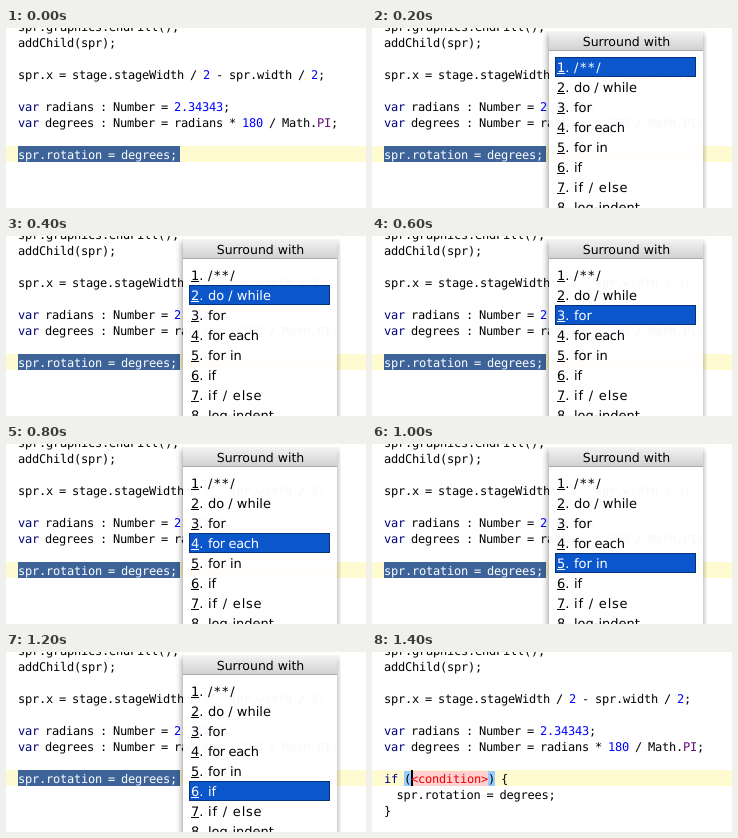
Write an HTML page that moves like this. It is 360x180 px and loops after 1.9 s.

```html
<!DOCTYPE html>
<html lang="en">
<head>
<meta charset="utf-8">
<title>Surround with</title>
<style>
  html, body { margin: 0; width: 100%; height: 100%; overflow: hidden; background: #fff; }
  svg { display: block; width: 360px; height: 180px; }
  text { white-space: pre; text-rendering: geometricPrecision; }
  .code { font: 12px "DejaVu Sans Mono", monospace; letter-spacing: -.224px; word-spacing: -1px; }
  .ui { font: 13px "DejaVu Sans", sans-serif; }
  .title { font-size: 12.5px; }
  .key { fill: #000080; }
  .num { fill: #0000ff; }
  .const { fill: #660e7a; }
  .slot { fill: #f00000; }
</style>
</head>
<body>
<svg id="stage" viewBox="0 0 360 180">
  <defs>
    <linearGradient id="bar" x1="0" y1="0" x2="0" y2="1">
      <stop offset="0" stop-color="#f4f4f4"/>
      <stop offset="1" stop-color="#cecece"/>
    </linearGradient>
    <filter id="blur" x="-20%" y="-20%" width="140%" height="140%">
      <feGaussianBlur stdDeviation="3"/>
    </filter>
    <clipPath id="rim">
      <path d="M169 3H335V180H169ZM177 3V180H331V3Z" clip-rule="evenodd"/>
    </clipPath>
  </defs>
  <rect width="360" height="180" fill="#fff"/>
  <rect y="118" width="360" height="16" fill="#fffbd0"/>
  <g id="code" class="code"></g>
  <g id="before" class="code">
    <rect x="12" y="118" width="162" height="16" fill="#3d6399"/>
  </g>
  <g id="after" class="code">
    <rect x="32" y="119" width="7" height="15" fill="#99ccff"/>
    <rect x="39" y="119" width="77" height="15" fill="#ffd0d0"/>
    <rect x="116" y="119" width="7" height="15" fill="#99ccff"/>
    <rect x="39" y="118" width="2" height="16" fill="#000"/>
  </g>
  <g id="popup" class="ui">
    <g clip-path="url(#rim)">
      <rect x="176" y="6" width="155" height="190" fill="#000" opacity=".4" filter="url(#blur)"/>
    </g>
    <g opacity=".97">
      <rect x="177" y="3" width="154" height="177" fill="#fff"/>
      <rect x="177" y="3" width="154" height="20" fill="url(#bar)"/>
      <path d="M177 22.5H331" stroke="#a8a8a8"/>
    </g>
    <text class="title" x="254.5" y="18" text-anchor="middle">Surround with</text>
    <g id="cursor">
      <rect x="183" y="29" width="141" height="20" fill="#0b56cb"/>
      <rect x="183.5" y="29.5" width="140" height="19" fill="none" stroke="#000" stroke-dasharray="1 1" opacity=".8"/>
    </g>
  </g>
</svg>
<script>
const NS = "http://www.w3.org/2000/svg";
const $ = id => document.getElementById(id);

function add(parent, tag, attrs, content = "") {
  const el = document.createElementNS(NS, tag);
  for (const k in attrs) el.setAttribute(k, attrs[k]);
  el.textContent = content;
  parent.appendChild(el);
  return el;
}

// A line is a list of strings; a [class, string] pair is coloured.
function line(parent, x, y, parts, fill = "#000") {
  const t = add(parent, "text", { x, y, fill });
  for (const p of parts) {
    if (Array.isArray(p)) add(t, "tspan", { class: p[0] }, p[1]);
    else add(t, "tspan", {}, p);
  }
}

const two = ["num", "2"], kw = ["key", "var"];
line($("code"), 12, 3, ["spr.graphics.endFill();"]);
line($("code"), 12, 19, ["addChild(spr);"]);
line($("code"), 12, 51, ["spr.x = stage.stageWidth / ", two, " - spr.width / ", two, ";"]);
line($("code"), 12, 83, [kw, " radians : Number = ", ["num", "2.34343"], ";"]);
line($("code"), 12, 99, [kw, " degrees : Number = radians * ", ["num", "180"], " / Math.", ["const", "PI"], ";"]);

line($("before"), 12, 131, ["spr.rotation = degrees;"], "#fff");

line($("after"), 12, 131, [["key", "if"], " (", ["slot", "<condition>"], ") {"]);
line($("after"), 24.5, 147, ["spr.rotation = degrees;"]);
line($("after"), 12, 163, ["}"]);

// Label and letter spacing of each menu entry.
const entries = [
  ["/**/", 1.6], ["do / while", 0], ["for", 0], ["for each", -.35],
  ["for in", 0], ["if", 0], ["if / else", .8], ["log-indent", 0]
];
const rows = entries.map(([label, gap], i) => {
  const y = 44 + 20 * i;
  const g = add($("popup"), "g", {});
  add(g, "text", { x: 185, y }, `${i + 1}.`);
  add(g, "text", { x: 202, y, "letter-spacing": gap }, label);
  add(g, "rect", { x: 185, y: y + 1, width: 8, height: 1 });
  return g;
});

const LOOP = 1900, STEP = 200, PICKS = 6;

function draw(ms) {
  const step = Math.floor((ms % LOOP) / STEP);
  const done = step > PICKS;
  const open = step > 0 && !done;
  const show = (id, on) => $(id).setAttribute("display", on ? "inline" : "none");
  show("before", !done);
  show("after", done);
  show("popup", open);
  if (!open) return;
  const pick = step - 1;
  $("cursor").setAttribute("transform", `translate(0 ${20 * pick})`);
  rows.forEach((g, i) => g.setAttribute("fill", i === pick ? "#fff" : "#000"));
}

const start = performance.now();
function tick() {
  draw(performance.now() - start);
  requestAnimationFrame(tick);
}
draw(0);
requestAnimationFrame(tick);
</script>
</body>
</html>
```
